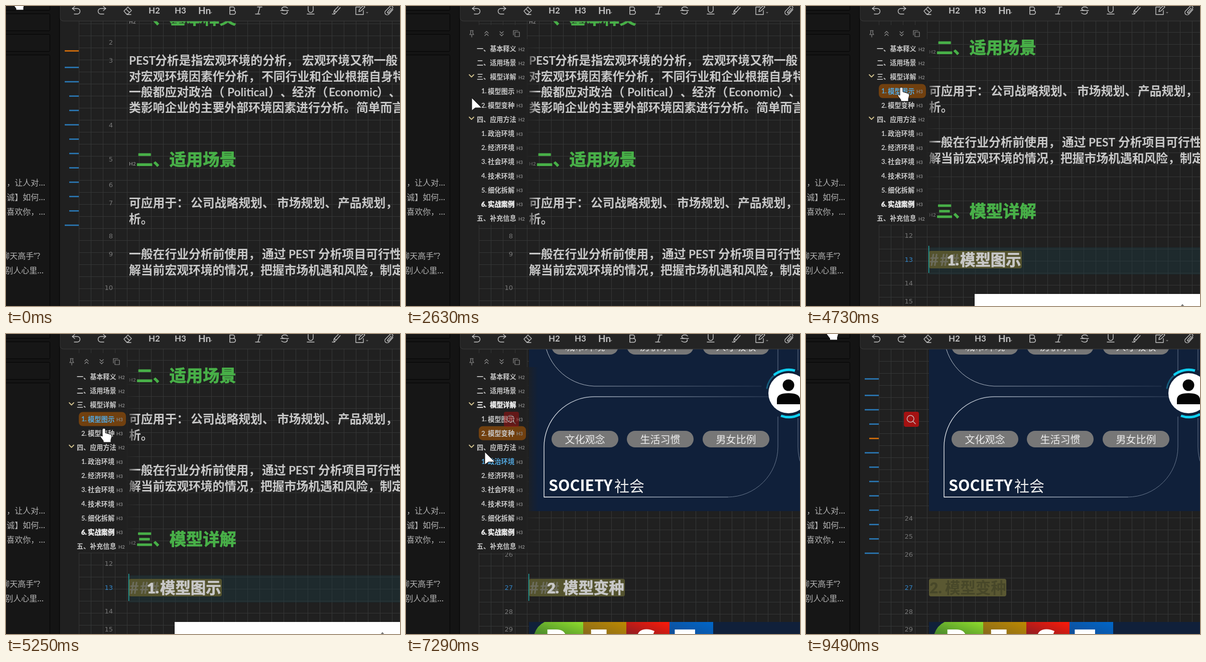
An HTML page that plays this animation: 785x598 px, repeating every 9.55 s.

```html
<!DOCTYPE html>
<html lang="zh-CN">
<head>
<meta charset="utf-8">
<title>大纲导航</title>
<style>
html,body{margin:0;width:100%;height:100%;overflow:hidden;background:#202020}
svg{display:block;width:100%;height:100%}
text{font-family:Lato,'Noto Sans CJK SC','Noto Sans CJK',sans-serif;font-weight:700;fill:#c8c8c8;white-space:pre;text-spacing-trim:space-all;stroke-linejoin:round}
.cjk text,text.cjk{font-family:'Noto Sans CJK SC','Noto Sans CJK',sans-serif;font-weight:400}
.head{fill:#48b048;font-weight:900;stroke:#48b048;stroke-width:.9}
.strong{font-weight:900;stroke:#c8c8c8;stroke-width:.7}
.hash{fill:#6c6c5c;letter-spacing:2px}
.ghost{font-weight:900;fill:#474729}
.tag{fill:#858585}
.num{font-family:'DejaVu Sans',sans-serif;font-weight:400;fill:#777;text-anchor:end}
.num.on{fill:#3182c4}
.grid{stroke:#353636;fill:none}
.line{fill:none;stroke-linecap:round;stroke-linejoin:round}
.side text{font-family:'Noto Sans','Noto Sans CJK SC','Noto Sans CJK',sans-serif;fill:#b4b4b4}
.pill text,text.thin{font-weight:300;fill:#eee}
.block{font-family:'Noto Sans',sans-serif;font-weight:800;fill:#fff}
.item.bold .name{font-weight:900;fill:#eee;stroke:#eee;stroke-width:.5}
.item.hover .name{fill:#52a8e0}
.item rect{fill:none}
.item.active rect{fill:#71400f}
</style>
</head>
<body>
<svg id="stage" viewBox="0 0 785 598" preserveAspectRatio="none"></svg>
<script>
const LOOP = 9550, CELL = 24;
const JUMP1 = 4700, JUMP2 = 5700, BLUR = 9430;

// text whose glyphs are centred on cy
const txt = (x, cy, s, size, cls = '', more = '') =>
  `<text x="${x}" y="${(cy + size * .375).toFixed(1)}" font-size="${size}" class="${cls}" ${more}>${s}</text>`;
const rect = (x, y, w, h, fill, rx = 0, more = '') =>
  `<rect x="${x}" y="${y}" width="${w}" height="${h}" fill="${fill}" rx="${rx}" ${more}/>`;
const path = (d, stroke, w = 1, more = '') =>
  `<path class="line" d="${d}" stroke="${stroke}" stroke-width="${w}" ${more}/>`;

const grid = (phase, bottom) => {
  let d = '';
  for (let x = 145.5; x < 785; x += CELL) d += `M${x} 0V${bottom}`;
  for (let y = phase; y < bottom; y += CELL) d += `M145 ${y}H785`;
  return `<path class="grid" d="${d}"/>`;
};
const nums = (list, on) => list.map(([n, y]) =>
  txt(213, y, n, 13, n === on ? 'num on' : 'num')).join('');
const heading = (y, s) => txt(245, y + 8, 'H2', 10, 'tag') + txt(259.5, y, s, 33.2, 'head');
// phrases given as x, text pairs
const body = (y, ...parts) => {
  let out = '';
  for (let i = 0; i < parts.length; i += 2)
    out += txt(parts[i], y, parts[i + 1], /[A-Z]/.test(parts[i + 1]) ? 22.7 : 23.8);
  return out;
};
const editing = (y, w, n, nx, s, sx) =>
  rect(245, y - 18, w, 35, '#54532e', 4) +
  txt(246, y, '###', 32, 'hash') + txt(nx, y, n, 29, 'strong') + txt(sx, y, s, 30.4, 'strong') +
  rect(244, y - 28, 1.3, 54, '#25b5b0');

const docA = grid(11.5, 860) +
  nums([[2, 72], [3, 108], [4, 237], [5, 305], [6, 356], [7, 392], [8, 458], [9, 494], [10, 561],
    [11, 631], [12, 680], [13, 728], [14, 775], [15, 811]], 13) +
  heading(23, '一、基本释义') +
  body(108, 245, 'PEST', 297, '分析是指宏观环境的分析，', 590, '宏观环境又称一般') +
  body(140, 245, '对宏观环境因素作分析，', 509, '不同行业和企业根据自身特') +
  body(171, 245, '一般都应对政治（', 441, 'Political', 523, '）、', 570, '经济（', 643, 'Economic', 739, '）、') +
  body(202, 245, '类影响企业的主要外部环境因素进行分析。', 698, '简单而言') +
  heading(306, '二、适用场景') +
  body(392, 245, '可应用于：', 368, '公司战略规划、', 540, '市场规划、', 661, '产品规划，') +
  body(424, 245, '析。') +
  body(494, 245, '一般在行业分析前使用，', 510, '通过', 563, 'PEST', 622, '分析项目可行性') +
  body(526, 245, '解当前宏观环境的情况，', 507, '把握市场机遇和风险，', 745, '制定') +
  heading(631, '三、模型详解') +
  rect(245, 704, 540, 54, '#1d3a42', 0, 'opacity=".4"') +
  editing(729, 185, '1.', 281, '模型图示', 307) +
  rect(336, 797, 449, 60, '#fff') + '<path d="M745 823l5-6 5 6z" fill="#777"/>';

const pill = (x, y, s) => `<g class="pill cjk">${rect(x, y, 133, 33, '#777', 16.5)}
  ${txt(x + 66.5, y + 17, s, 20, '', 'text-anchor="middle"')}</g>`;
const letter = (x, s) => `<text class="block" x="${x}" y="643" font-size="75">${s}</text>`;
const block = (x, id) => rect(x, 574, 87, 30, `url(#${id})`);

const docB = grid(6.5, 600) +
  nums([[24, 367], [25, 403], [26, 439], [27, 505], [28, 553], [29, 588]], 27) +
  rect(245, 0, 540, 353, '#10203a') +
  path('M275 0A104 104 0 0 0 375 104H708', 'url(#fade)') +
  path('M741 0V74M741 165V225A100 100 0 0 1 641 325', '#68778d') +
  path('M641 325H275V225A100 100 0 0 1 375 125H722', 'url(#fade)', 1.3) +
  path('M781 0V72M781 168V225q0 18 6 34', '#68778d') +
  pill(290, 8, '城市环境') + pill(440, 8, '房价水平') + pill(591, 8, '人才吸收') +
  pill(290, 193, '文化观念') + pill(440, 193, '生活习惯') + pill(591, 193, '男女比例') +
  txt(284, 302, 'SOCIETY', 30.5, 'cjk', 'style="font-weight:700;fill:#fff"') +
  txt(415, 303, '社会', 30, 'cjk thin') +
  path('M719 108A44 44 0 0 1 735 81', '#155b7b', 3) +
  path('M733 82A47 47 0 0 1 775 73M747 163A47 47 0 0 0 785 160', '#0fd0f2', 5, 'style="stroke-linecap:butt"') +
  '<circle cx="762" cy="118" r="40" fill="#fff"/><circle cx="762" cy="102" r="11.5" fill="#050505"/>' +
  '<path d="M739 140v-9q0-13 23-13t23 13v9z" fill="#050505"/>' +
  rect(245, 574, 540, 30, '#10203a') +
  `<g clip-path="url(#round)">${rect(254, 574, 99, 30, 'url(#green)')}</g>` +
  block(353, 'gold') + block(439, 'red') + block(525, 'blue') +
  letter(275, 'P') + letter(362, 'E') + letter(457, 'S') + letter(534, 'T') +
  `<g id="focused">${editing(506, 191, '2.', 281, '模型变种', 313)}</g>` +
  `<g id="blurred">${rect(245, 488, 154, 35, '#5a5832', 4)}
    ${txt(246, 506, '2.', 30, 'ghost')}${txt(277, 506, '模型变种', 30.4, 'ghost')}</g>`;

const items = ['一、基本释义', '二、适用场景', '三、模型详解', '1.模型图示', '2.模型变种', '四、应用方法',
  '1.政治环境', '2.经济环境', '3.社会环境', '4.技术环境', '5.细化拆解', '6.实战案例', '五、补充信息'];
const isSub = i => /^\d/.test(items[i]);
const rowY = i => 85 + i * 28.17;
const tickY = i => (i ? 93.8 : 89.5) + i * 28.6;

const ticks = items.map((s, i) => {
  const x = isSub(i) ? 126 : 117;
  return `<rect class="tick" x="${x}" y="${(tickY(i) - 1.3).toFixed(1)}" width="${145 - x}" height="2.6"/>`;
}).join('');

const rows = items.map((s, i) => {
  const y = rowY(i), sub = isSub(i);
  const name = sub
    ? txt(150, y, s.slice(0, 2), 13, 'name') + txt(163, y, s.slice(2), 13.3, 'name')
    : txt(141, y, s, 13.1, 'name');
  return `<g class="item"><rect x="145" y="${y - 14}" width="94" height="28" rx="8"/>
    ${name}${txt(sub ? 220 : 224, y + 1, sub ? 'H3' : 'H2', 9.5, 'tag')}</g>`;
}).join('');

const panel = rect(109, 38, 132, 398, '#202020') + rect(241, 66, 22, 370, 'url(#edge)') +
  path('M128 49h6M129 49v5l-2 3h8l-2-3v-5M131 57v5', '#8c8c8c', 1.2) +
  path('M157 54l3.5-3.5 3.5 3.5M157 59l3.5-3.5 3.5 3.5M187 51l3.5 3.5 3.5-3.5M187 56l3.5 3.5 3.5-3.5', '#8c8c8c', 1.2) +
  path('M217 52h9v9h-9zM214 58v-9h9', '#8c8c8c', 1.2) +
  rows + path('M126 137l4.5 4.5 4.5-4.5M126 221.5l4.5 4.5 4.5-4.5', '#d2c28e', 1.8);

const INK = '#c2c2c2';
const label = (x, s, size) => txt(x, 9, s, size, '', `style="fill:${INK}"`);
const toolbar = `<path d="M107.5-2V22q0 8 8 8H787V-2z" fill="#242424" stroke="#3b3b3b"/>` +
  path('M137 1l-5 4 5 4M132 5h10a5.5 5.5 0 0 1 0 11h-6', INK, 1.4) +
  path('M194 1l5 4-5 4M199 5h-10a5.5 5.5 0 0 0 0 11h6', INK, 1.4) +
  path('M235 10l8-8 7 7-7 7h-3zM239 6l7 7M241 17h8', INK, 1.4) +
  label(284, 'H2', 17) + label(336, 'H3', 17) + label(383, 'Hn', 19) +
  `<path d="M406 12h5l-2.5 3zM717 12h5l-2.5 3z" fill="#777"/>` +
  path('M446 2h6a3.5 3.5 0 0 1 0 7h-6zM446 9h7.5a3.7 3.7 0 0 1 0 7.5h-7.5z', INK, 1.6) +
  path('M501 2h9M497 16h9M506 2l-4 14', INK, 1.5) +
  path('M561 4q-3-3-8-2-5 2-3 5 2 2 6 2M547 9h16M549 14q4 3 8 2 5-2 3-5', INK, 1.5) +
  path('M602 1v7a5 5 0 0 0 10 0V1M600 16h14', INK, 1.5) +
  path('M666 3l-8 9-4-3 8-8M654 9l-1 4 2 2 3-3M650 16h5', INK, 1.4) +
  path('M706 2h-9v15h15V9M703 11l1-4 8-8 3 3-8 8z', INK, 1.4) +
  path('M771 7l-8 9a4.5 4.5 0 0 1-7-6l9-9a3.2 3.2 0 0 1 5 4l-8 9a1.5 1.5 0 0 1-2-2l7-8', INK, 1.4);

const box = (y, h) => rect(-5, y + .5, 92.5, h, '#161616', 2, 'stroke="#030303"');
const sidebar = rect(0, 0, 107, 598, '#141414') + rect(106, 0, 1.2, 598, '#050505') +
  box(-20, 28) + box(15, 34) + box(56, 34) + box(97, 520) +
  '<g class="side" text-anchor="end" style="font-weight:400">' +
  [[78, 352, '绍，让人对...'], [78, 381, '真诚】如何...'], [78, 410, '人喜欢你，...'],
    [68, 498, '聊天高手”?'], [75, 527, '别人心里...']]
    .map(([x, y, s]) => txt(x, y, s, 16, '', 'style="font-weight:400"')).join('') + '</g>';

const search = rect(195, 155, 30, 30, '#a51212', 4) +
  path('M215 169a6.8 6.8 0 1 1-13.6 0 6.8 6.8 0 1 1 13.6 0M213 174l5 5', '#c9b5b5', 1.5);

const beam = 'M-5-11.5H-1.5L0-10.5 1.5-11.5H5M0-10.5V10.5M-5 11.5H-1.5L0 10.5 1.5 11.5H5';
const solid = d => `<path d="${d}" fill="#fff" stroke="#111" stroke-linejoin="round"/>`;
const shapes = {
  arrow: solid('M0 0V25.5L7 20H20z'),
  hand: solid('M-3 2Q-3 0 0 0T3 2V9L13 12Q16 13 16 16L14 23V28H-1V25L-7 17Q-8 13-3 16z'),
  beam: path(beam, '#000', 4.5) + path(beam, '#fff', 2)
};

const ramp = (id, a, b) =>
  `<linearGradient id="${id}" y1="1" x2="1" y2="0"><stop stop-color="${a}"/><stop offset="1" stop-color="${b}"/></linearGradient>`;

stage.innerHTML = `<defs>
  ${ramp('green', '#3f7d2b', '#8fdc2c')}${ramp('gold', '#82651f', '#bd8a00')}
  ${ramp('red', '#821d25', '#ff1a08')}${ramp('blue', '#124b91', '#0066c8')}
  <linearGradient id="fade" gradientUnits="userSpaceOnUse" x1="275" y1="325" x2="715" y2="100">
    <stop stop-color="#fff"/><stop offset=".5" stop-color="#8492a6"/><stop offset="1" stop-color="#263650"/></linearGradient>
  <linearGradient id="edge"><stop stop-color="#202020" stop-opacity=".8"/><stop offset="1" stop-color="#202020" stop-opacity="0"/></linearGradient>
  <clipPath id="round"><path d="M255 600Q260 582 276 574H353V600z"/></clipPath></defs>
  ${rect(0, 0, 785, 598, '#202020')}
  <g id="docA">${docA}</g><g id="docB">${docB}</g>
  <g id="ticks">${ticks}</g><g id="panel">${panel}</g><g id="search">${search}</g>
  ${toolbar}${sidebar}
  <g id="cursor">${Object.entries(shapes).map(([k, s]) => `<g id="${k}">${s}</g>`).join('')}</g>`;

const $ = id => document.getElementById(id);
const show = (id, on) => $(id).setAttribute('visibility', on ? 'visible' : 'hidden');
const itemEls = document.querySelectorAll('.item'), tickEls = document.querySelectorAll('.tick');

// time, x, y
const route = [[0, 21, -20], [600, 21, -20], [850, 130, 55], [1300, 568, 312], [1570, 540, 296], [1640, 520, 291],
  [1830, 379, 284], [1950, 379, 284], [2200, 230, 235], [2470, 131, 183], [2780, 131, 183], [3150, 180, 212],
  [3470, 190, 246], [3620, 190, 246], [3840, 187, 150], [3970, 187, 142], [4110, 188, 118], [4330, 190, 162],
  [5090, 190, 162], [5250, 195, 188], [5600, 194, 193], [5780, 194, 193], [6080, 245, 275], [6420, 340, 370],
  [6600, 340, 370], [6950, 235, 295], [7170, 190, 256], [7290, 157, 235], [7570, 156, 222], [7850, 190, 226],
  [8000, 190, 226], [8250, 260, 290], [8460, 330, 335], [8640, 330, 335], [9000, 220, 180], [9300, 90, 25],
  [9490, 49, -16], [9550, 21, -20]];
const at = t => {
  const i = Math.max(1, route.findIndex(p => p[0] >= t));
  const [a, b] = [route[i - 1], route[i]];
  const k = (t - a[0]) / (b[0] - a[0]);
  return [a[1] + (b[1] - a[1]) * k, a[2] + (b[2] - a[2]) * k];
};
const clamp = v => Math.max(0, Math.min(1, v));
const fade = (t, inAt, outAt) => clamp((t - inAt) / 250) * (1 - clamp((t - outAt) / 200));

function draw(now) {
  const t = now % LOOP;
  const open = fade(t, 2180, 6140) + fade(t, 6920, 8270);
  const second = t >= JUMP2;

  show('docA', !second);
  show('docB', second);
  show('search', second);
  show('focused', second && t < BLUR);
  show('blurred', t >= BLUR);
  $('docA').setAttribute('transform', `translate(0 ${t < JUMP1 ? 0 : -223})`);
  $('panel').setAttribute('opacity', open);
  $('ticks').setAttribute('opacity', 1 - open);
  $('search').setAttribute('opacity', 1 - open * .5);

  // hover colour trails the pointer a little
  const current = t < JUMP1 ? 0 : second ? 4 : 3;
  const [hx, hy] = at(Math.max(0, t - 120));
  const hovered = open > 0 && hx > 149 && hx < 240 ? Math.round((hy - 85) / 28.17) : -1;
  itemEls.forEach((el, i) => {
    el.classList.toggle('active', i === current && current > 0);
    el.classList.toggle('bold', i === 11 || (i === 2 && second));
    el.classList.toggle('hover', i === hovered);
  });
  tickEls.forEach((el, i) => el.setAttribute('fill', i === current ? '#d9700a' : '#2a7ab8'));

  const [x, y] = at(t);
  const kind = x < 88 || (open > .3 && x > 160 && x < 241 && y > 71) ? 'hand'
    : x > 241 && y > 31 ? 'beam' : 'arrow';
  $('cursor').setAttribute('transform', `translate(${x.toFixed(1)} ${y.toFixed(1)})`);
  Object.keys(shapes).forEach(k => show(k, k === kind));
}

const start = performance.now();
(function tick() {
  draw(performance.now() - start);
  requestAnimationFrame(tick);
})();
</script>
</body>
</html>
```
